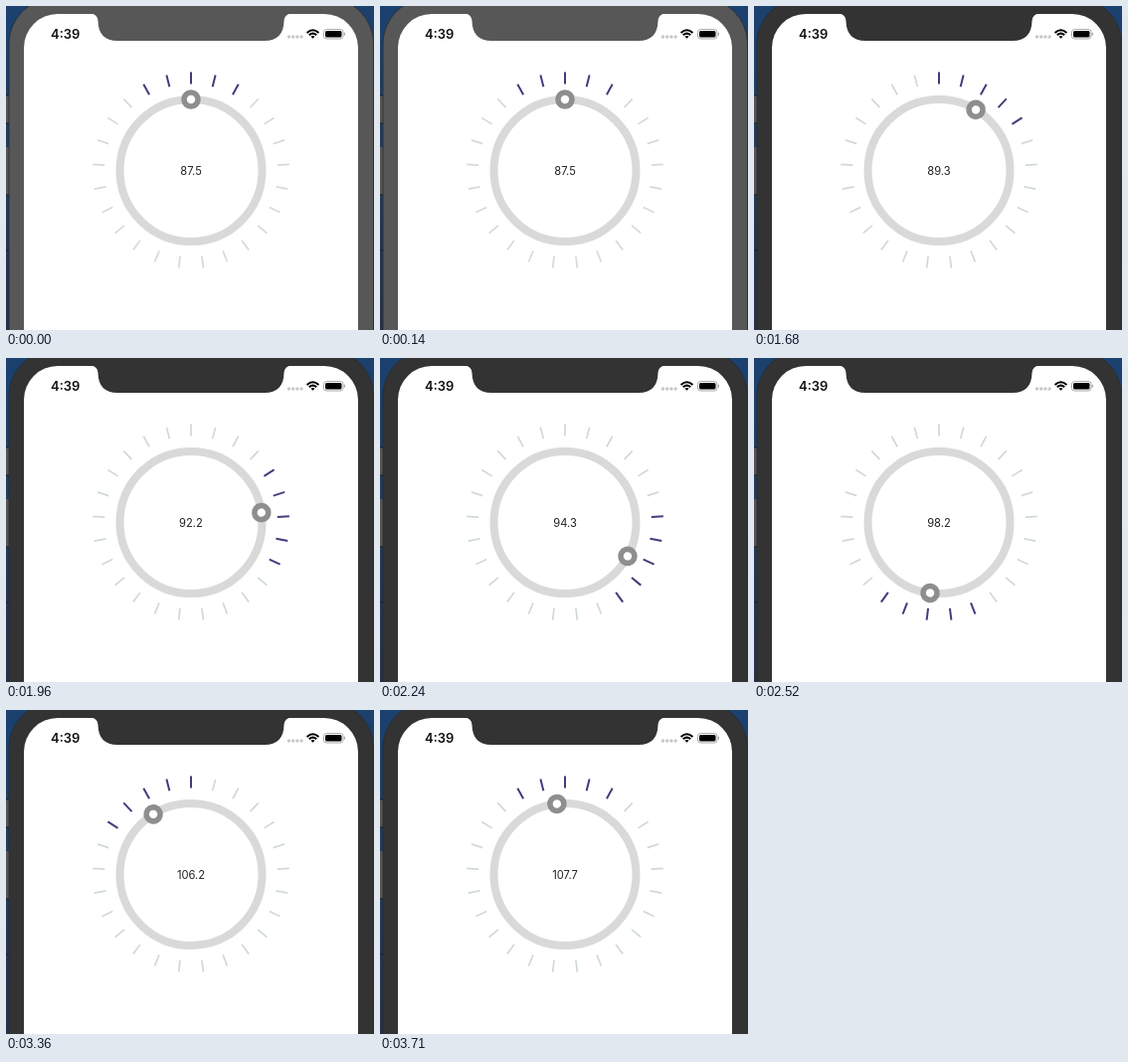
An HTML page for the animation above (4410 ms loop, 370 by 326 pixels).

```html
<!DOCTYPE html>
<html lang="en">
<head>
<meta charset="utf-8">
<title>Circular dial</title>
<style>
  html, body { margin: 0; width: 100%; height: 100%; overflow: hidden; }
  svg { display: block; width: 100%; height: 100%; }
  text { font-family: Inter, "Liberation Sans", sans-serif; }
</style>
</head>
<body>
<svg viewBox="0 0 370 326">
  <defs>
    <linearGradient id="desk" x2="0" y2="1">
      <stop offset="0" stop-color="#1b416f"/>
      <stop offset=".5" stop-color="#243a5c"/>
      <stop offset="1" stop-color="#27304a"/>
    </linearGradient>
  </defs>
  <rect width="370" height="326" fill="url(#desk)"/>
  <path d="M0 90h4v28h-4zM0 142h4v48h-4z" fill="#555"/>
  <path d="M0 90h4M0 118h4M0 190h4M0 246h4" stroke="#111a28"/>
  <g id="bezel">
    <rect x="3" y="-8" width="366.5" height="400" rx="46" stroke="#292b2e" stroke-width=".8"/>
    <rect x="18" y="8" width="336" height="360" rx="34" fill="#fff"/>
    <path d="M85 7.5Q92 8 92.500 15Q93 35 112 35H260Q279 35 279.500 15Q280 8 287 7.500Z"/>
  </g>

  <text x="45" y="32.800" font-size="13" font-weight="600" fill="#111">4:39</text>
  <g fill="#c8c8c8">
    <circle cx="284.500" cy="31" r="1.700"/><circle cx="288.700" cy="31" r="1.700"/>
    <circle cx="292.900" cy="31" r="1.700"/><circle cx="297.100" cy="31" r="1.700"/>
  </g>
  <g fill="none" stroke="#000" stroke-width="2">
    <path d="M302.600 27Q308.500 21.500 314.400 27M304.800 29.300Q308.500 26 312.200 29.300"/>
    <path d="M306.500 30.700Q308.500 29.200 310.500 30.700L308.500 32.800Z" fill="#000" stroke="none"/>
  </g>
  <rect x="319.500" y="23.500" width="19.500" height="9.500" rx="2.800" fill="none" stroke="#aaa"/>
  <rect x="321" y="25" width="16.500" height="6.500" rx="1.500"/>
  <path d="M340.200 26.700q1.300 1.500 0 3z" fill="#999" stroke="#999" stroke-width=".5"/>

  <g id="ticks"></g>
  <circle cx="186" cy="165.500" r="71.500" fill="none" stroke="#d9d9d9" stroke-width="8"/>
  <circle id="knob" cx="186" cy="94" r="7" fill="#fff" stroke="#8e8e8e" stroke-width="5.600"/>
  <text id="value" x="186" y="170" font-size="11.200" text-anchor="middle" fill="#222"></text>
</svg>
<script>
const LOOP = 4410, STEP = 70, TICKS = 25, DARKEN_AT = 1120;
const VALUE_START = 87.5, VALUE_PER_DEGREE = 20 / 350;

// [time in ms, knob angle in degrees clockwise from the top]
const drag = [
  [1400, 0], [1680, 31.2], [1960, 82], [2240, 118.3], [2520, 187.2],
  [3010, 278.9], [3080, 290], [3360, 328], [3640, 349], [3710, 353.5]
];

const bezel = document.getElementById("bezel");
const knob = document.getElementById("knob");
const value = document.getElementById("value");

const ticks = Array.from({ length: TICKS }, (_, i) => {
  const line = document.createElementNS("http://www.w3.org/2000/svg", "path");
  line.setAttribute("d", "M186 66.5V78.5");
  line.setAttribute("transform", `rotate(${i * 360 / TICKS} 186 165.5)`);
  return document.getElementById("ticks").appendChild(line);
});

function angleAt(time) {
  if (time <= drag[0][0]) return 0;
  const next = drag.findIndex(([t]) => t >= time);
  if (next < 0) return drag[drag.length - 1][1];
  const [t0, a0] = drag[next - 1], [t1, a1] = drag[next];
  return a0 + (a1 - a0) * (time - t0) / (t1 - t0);
}

function render(now) {
  const time = Math.floor((now % LOOP) / STEP) * STEP;
  const angle = angleAt(time);
  const nearest = Math.round(angle * TICKS / 360);
  const dark = time >= DARKEN_AT;

  bezel.setAttribute("fill", dark ? "#333" : "#575757");
  knob.setAttribute("transform", `rotate(${angle} 186 165.5)`);
  value.textContent = (VALUE_START + angle * VALUE_PER_DEGREE).toFixed(1);
  ticks.forEach((tick, i) => {
    const active = (i - nearest + 2 + TICKS) % TICKS < 5;
    tick.setAttribute("stroke", active ? "#403d7c" : dark ? "#cfdad8" : "#d9d9d9");
    tick.setAttribute("stroke-width", active ? 2 : 1.7);
  });
}

const start = performance.now();
function frame() {
  render(performance.now() - start);
  requestAnimationFrame(frame);
}
frame();
</script>
</body>
</html>
```
